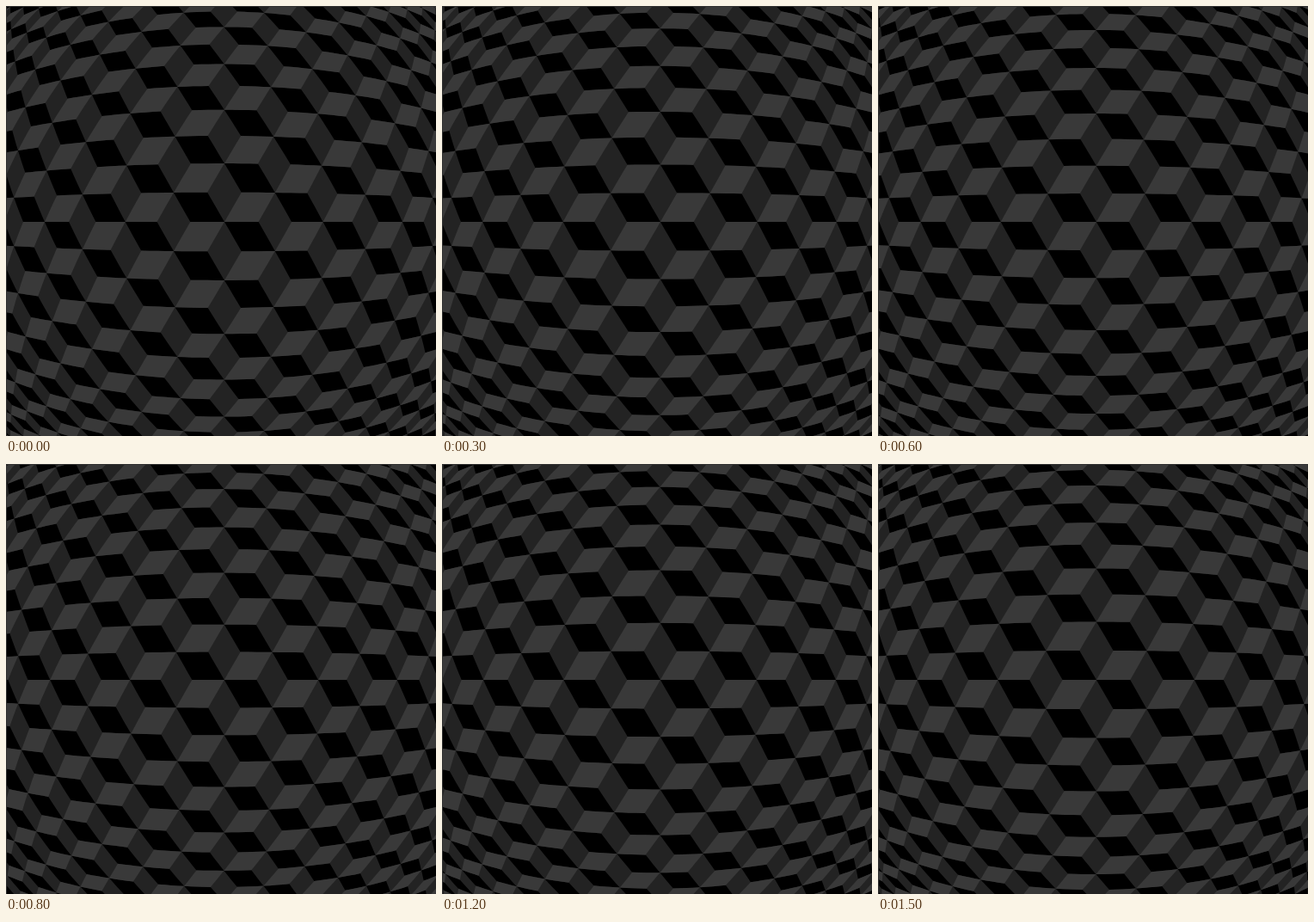
Animation of 500x500 px, one loop 1.6 s. Source, as an HTML page with a canvas:

```html
<!DOCTYPE html>
<html>
<head>
<meta charset="utf-8">
<style>
  html, body { margin: 0; width: 100%; height: 100%; overflow: hidden; background: #232323; }
  canvas { display: block; }
</style>
</head>
<body>
<canvas id="stage" width="500" height="500"></canvas>
<script>
const ctx = document.getElementById('stage').getContext('2d');
const CENTER = 251;
const H = Math.sqrt(3) / 2;     // rhombus height; its edge is 1
const SHIFT = 0.075;
const ASPECT = 1.065;           // the lens is slightly wider than tall
const SPLIT = 4;
const STEP = 100, HALF_STEPS = 8;

const mix = (a, b, f) => a + (b - a) * f;

// Flat plane seen through a round lens: zoom falls off with distance.
function warp(x, y, { zoom, curve }) {
  const spread = x * x / ASPECT + y * y * ASPECT;
  const scale = zoom / Math.sqrt(1 + curve * spread);
  return [CENTER + x * scale, CENTER + y * scale];
}

function addRhombus(path, corners, lens) {
  corners.forEach(([x, y], i) => {
    const [nx, ny] = corners[(i + 1) % 4];
    for (let k = 0; k < SPLIT; k++) {
      const f = k / SPLIT;
      const point = warp(mix(x, nx, f), mix(y, ny, f), lens);
      if (i || k) path.lineTo(...point);
      else path.moveTo(...point);
    }
  });
  path.closePath();
}

function draw(lens) {
  const black = new Path2D(), light = new Path2D();
  for (let col = -12; col <= 12; col++) {
    for (let row = -10; row <= 10; row++) {
      const x = SHIFT + col * 1.5;
      const y = (2 * row + Math.abs(col % 2)) * H;
      const side = dir => [[x, y], [x + dir, y], [x + dir * 1.5, y + H], [x + dir * 0.5, y + H]];
      addRhombus(black, side(1), lens);
      addRhombus(light, side(-1), lens);
    }
  }
  ctx.fillStyle = '#232323';
  ctx.fillRect(0, 0, 500, 500);
  ctx.fillStyle = '#000';
  ctx.fill(black);
  ctx.fillStyle = '#393939';
  ctx.fill(light);
  ctx.fillStyle = '#333';
  ctx.fillRect(0, 0, 500, 1);
  ctx.fillRect(0, 0, 1, 500);
}

function frame() {
  const step = Math.floor(performance.now() / STEP) % (2 * HALF_STEPS);
  const progress = Math.min(step, 2 * HALF_STEPS - step) / HALF_STEPS;
  draw({ zoom: mix(39.8, 37.6, progress), curve: mix(0.0094, 0.0074, progress) });
  requestAnimationFrame(frame);
}
frame();
</script>
</body>
</html>
```
